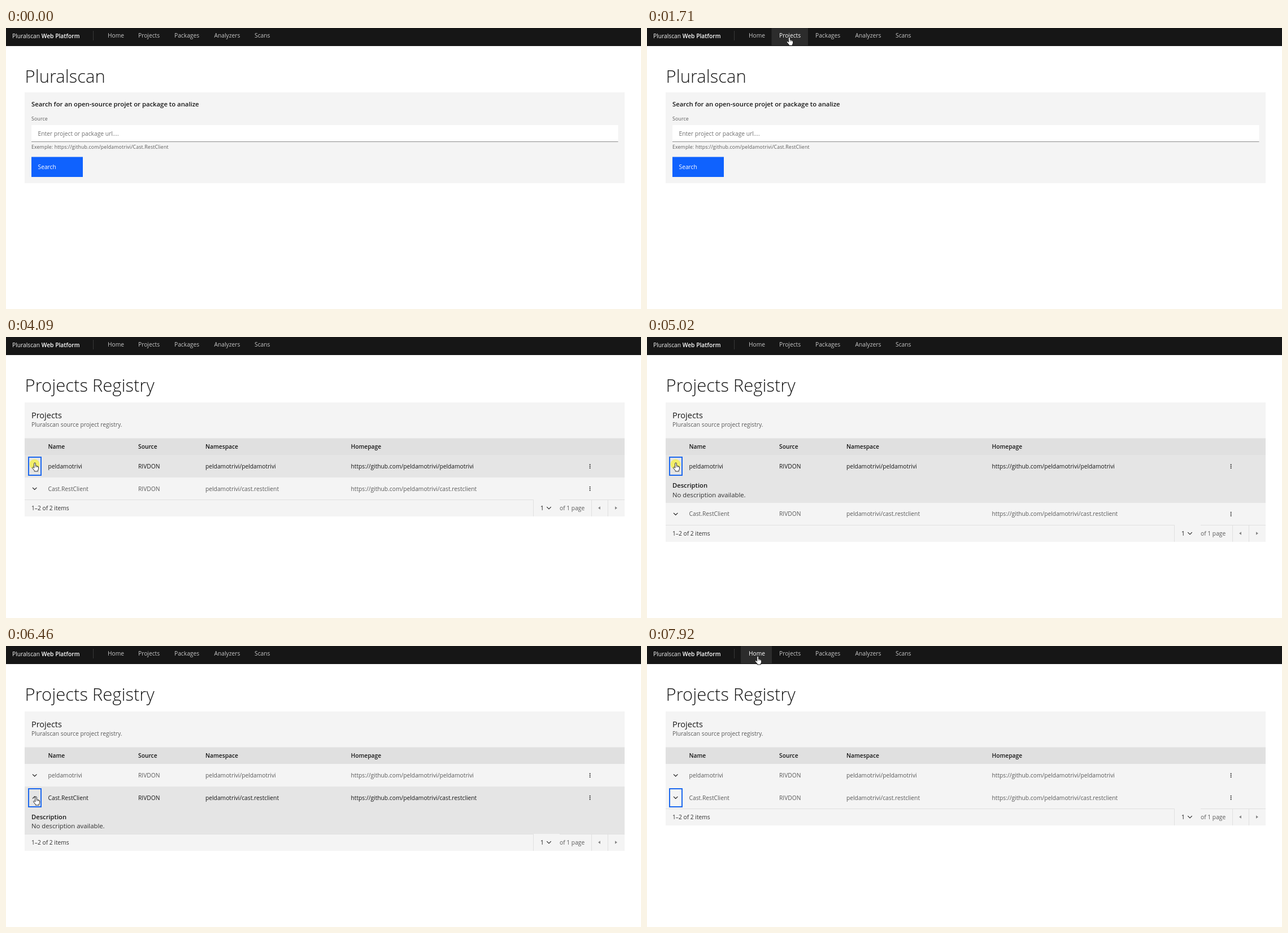
These frames come from a looping animation (1124 by 498 pixels, 8 s). An HTML page with a canvas:

```html
<!DOCTYPE html>
<html lang="en">
<head>
<meta charset="utf-8">
<title>Pluralscan Web Platform</title>
<style>
  html, body { margin: 0; width: 100%; height: 100%; overflow: hidden; background: #fff; }
  canvas { display: block; width: 1124px; height: 498px; }
</style>
</head>
<body>
<canvas id="stage"></canvas>
<script>
const W = 1124, H = 498, LOOP = 8000;
const canvas = document.getElementById('stage');
const ctx = canvas.getContext('2d');
const dpr = window.devicePixelRatio || 1;
canvas.width = W * dpr;
canvas.height = H * dpr;

const INK = '#161616', MUTED = '#5a5a5a', CARD = '#f4f4f4', LINE = '#e0e0e0', BLUE = '#0f62fe';
const BODY = 10.25, ROW_HEIGHT = 39.5, PANEL_HEIGHT = 45;
const USER = 'peldamotrivi';
const SITE = 'https://github.com/';

const NAV = [
  { label: 'Home', x: 180 },
  { label: 'Projects', x: 234 },
  { label: 'Packages', x: 298 },
  { label: 'Analyzers', x: 368.5 },
  { label: 'Scans', x: 440 }
];
const COLUMNS = [74.5, 234, 353, 610.5];
const ROWS = [
  [USER, 'RIVDON', `${USER}/${USER}`, `${SITE}${USER}/${USER}`],
  ['Cast.RestClient', 'RIVDON', `${USER}/cast.restclient`, `${SITE}${USER}/cast.restclient`]
];
const CLICKS = [4090, 5020, 6320, 7110];

// time, x, y of the pointer tip
const POINTER = [
  [470, 1010, 468], [1270, 252, 16],
  [3180, 252, 16], [3950, 51, 223],
  [5090, 51, 223], [5310, 53, 260], [5530, 53, 267],
  [7140, 53, 267], [7850, 196, 18]
];

const HAND = new Path2D('M-1.3 1.2Q-1.2 0 0 0Q1.2 0 1.3 1.2V5.2Q2.8 4.6 3.3 5.8' +
  'Q4.8 5.2 5.1 6.5Q6.5 6.3 6.5 7.8V10.6Q6.4 12 5.4 13.2V15H-.8V13.6L-4.3 9.4' +
  'Q-4.9 8 -3.6 7.6Q-2.6 7.5 -1.3 9.2Z');
const ARROW = new Path2D('M0 0V13.5L3.1 10.6L5.2 15.4L7.4 14.4L5.3 9.8H9.6Z');

const ramp = (t, from, to) => Math.min(1, Math.max(0, (t - from) / (to - from)));
const ease = p => p * p * (3 - 2 * p);
const between = (t, from, to) => t >= from && t < to;

function pointerAt(t) {
  let i = 0;
  while (i < POINTER.length - 2 && t >= POINTER[i + 1][0]) i++;
  const [t0, x0, y0] = POINTER[i], [t1, x1, y1] = POINTER[i + 1];
  const p = ease(ramp(t, t0, t1));
  return { x: x0 + (x1 - x0) * p, y: y0 + (y1 - y0) * p };
}

function box(x, y, w, h, color, alpha = 1) {
  ctx.globalAlpha = alpha;
  ctx.fillStyle = color;
  ctx.fillRect(x, y, w, h);
  ctx.globalAlpha = 1;
}

function text(str, x, y, color = INK, size = BODY, weight = 400, spacing = 0) {
  ctx.font = `${weight} ${size}px "Open Sans", "Noto Sans", sans-serif`;
  ctx.letterSpacing = spacing + 'px';
  ctx.fillStyle = color;
  ctx.fillText(str, x, y);
}

const title = str => text(str, 33.5, 97, INK, 31, 300);

function chevron(x, y, turn = 0) {
  const k = 1 - 2 * turn;
  ctx.beginPath();
  ctx.moveTo(x - 3.7, y - 1.8 * k);
  ctx.lineTo(x, y + 1.8 * k);
  ctx.lineTo(x + 3.7, y - 1.8 * k);
  ctx.strokeStyle = INK;
  ctx.lineWidth = 1.1;
  ctx.stroke();
}

function caret(x, y, dir) {
  ctx.beginPath();
  ctx.moveTo(x + 2 * dir, y);
  ctx.lineTo(x - 2 * dir, y - 2.8);
  ctx.lineTo(x - 2 * dir, y + 2.8);
  ctx.fillStyle = '#858585';
  ctx.fill();
}

function drawHeader(t) {
  box(0, 0, W, 32, INK);
  text('Pluralscan', 11, 17.6, '#f4f4f4');
  text('Web Platform', 62.7, 17.6, '#fff', BODY, 600);
  box(154, 5, 1, 17, '#393939');

  const glow = {
    Home: ramp(t, 7640, 7850),
    Projects: ramp(t, 1420, 1710) * (1 - ramp(t, 3220, 3440))
  };
  const lit = {
    Home: t >= 7920,
    Projects: between(t, 1200, 3290)
  };
  box(166, 0, 55, 31, '#2c2c2c', glow.Home);
  box(220.5, 0, 64.5, 31, '#2c2c2c', glow.Projects);
  for (const { label, x } of NAV) text(label, x, 17.3, lit[label] ? '#fff' : '#c6c6c6');
}

function drawHome() {
  title('Pluralscan');
  box(33, 114, 1062, 161, CARD);
  text('Search for an open-source projet or package to analize', 45, 138.8, INK, 11.3, 600);
  text('Source', 45, 163.6, MUTED, 8.7, 400, 0.18);
  box(45, 172, 1038.5, 29.5, '#fff');
  box(45, 201, 1038.5, 1, '#8d8d8d');
  text('Enter project or package url....', 56.5, 190.7, '#6f6f6f');
  text(`Exemple: ${SITE}${USER}/Cast.RestClient`, 45, 213.8, MUTED, 8.7, 400, 0.18);
  box(45, 228.5, 91, 35.5, BLUE);
  text('Search', 56.5, 249.7, '#fff');
}

function drawRow(cells, y, { tint, open, hover, focus }) {
  const bottom = y + ROW_HEIGHT;
  const top = Math.round(y), height = Math.round(bottom) - top;
  box(33, top, 1062, height, CARD);
  box(33, top, 1062, height, '#e5e5e5', tint);
  cells.forEach((cell, i) => text(cell, COLUMNS[i], y + 23.7, hover ? INK : MUTED));
  chevron(50.7, y + 19.8, open);
  for (const d of [-3, 0, 3]) box(1032.8, y + 19.1 + d, 1.7, 1.7, INK);
  if (focus) {
    ctx.strokeStyle = '#1c68ee';
    ctx.lineWidth = 2;
    ctx.strokeRect(40, top + 4, 22, 32);
  }
  if (open > 0) {
    ctx.save();
    ctx.beginPath();
    ctx.rect(33, top + height, 1062, PANEL_HEIGHT * open);
    ctx.clip();
    box(33, top + height, 1062, PANEL_HEIGHT, '#e5e5e5');
    text('Description', 45, bottom + 18.3, INK, 11.2, 600);
    text('No description available.', 45, bottom + 34.8, '#303030', 11.3);
    ctx.restore();
  }
  return bottom + PANEL_HEIGHT * open;
}

function drawPagination(y) {
  const top = Math.round(y);
  box(33, top, 1062, 30, CARD);
  box(33, top, 900, 1, LINE);
  box(980, top, 115, 1, LINE);
  for (const x of [933, 1036, 1065]) box(x, top, 1, 30, LINE);
  text('1\u20132 of 2 items', 45, y + 18.3, '#303030');
  text('1', 946, y + 18.3);
  chevron(961, y + 14.7);
  text('of 1 page', 980, y + 18.3, MUTED);
  caret(1050, y + 14.7, -1);
  caret(1080, y + 14.7, 1);
}

function drawRegistry(t, pointer) {
  title('Projects Registry');
  box(33, 116, 1062, 64, CARD);
  text('Projects', 45, 144, INK, 14.5);
  text('Pluralscan source project registry.', 45, 159, MUTED);
  box(33, 179.5, 1062, 30, LINE);
  ['Name', 'Source', 'Namespace', 'Homepage'].forEach((name, i) =>
    text(name, COLUMNS[i], 197.8, INK, BODY, 600));

  const states = [
    {
      open: ease(ramp(t, 4090, 4290)) - ease(ramp(t, 5020, 5230)),
      tint: t < 4090 ? 0 : 1 - ramp(t, 5330, 5530),
      focus: between(t, 4090, 6320)
    },
    {
      open: ease(ramp(t, 6330, 6460)) - ease(ramp(t, 7110, 7320)),
      tint: ramp(t, 6330, 6460) - ramp(t, 7330, 7540),
      focus: t >= 6320
    }
  ];
  let y = 209.3;
  states.forEach((state, i) => {
    state.hover = pointer.y >= y && pointer.y < y + ROW_HEIGHT;
    y = drawRow(ROWS[i], y, state);
  });
  drawPagination(y);
}

function drawPointer(t, { x, y }) {
  if (t < 470) return;
  if (CLICKS.some(click => between(t, click, click + 140))) {
    ctx.fillStyle = 'rgba(243, 238, 92, .9)';
    ctx.beginPath();
    ctx.arc(x - 0.5, y + 2.5, 9, 0, 2 * Math.PI);
    ctx.fill();
  }
  const overLink = y < 31 || (t >= 3180 && x < 63 && y > 212);
  const shape = overLink ? HAND : ARROW;
  ctx.save();
  ctx.translate(x, y);
  ctx.fillStyle = '#fff';
  ctx.strokeStyle = '#111';
  ctx.lineWidth = 0.9;
  ctx.lineJoin = 'round';
  ctx.fill(shape);
  ctx.stroke(shape);
  if (overLink) {
    ctx.lineWidth = 0.6;
    ctx.beginPath();
    for (const dx of [1.3, 3.3, 5.1]) {
      ctx.moveTo(dx, 5.8);
      ctx.lineTo(dx, 8);
    }
    ctx.stroke();
  }
  ctx.restore();
}

function draw(t) {
  const pointer = pointerAt(t);
  ctx.setTransform(dpr, 0, 0, dpr, 0, 0);
  box(0, 0, W, H, '#fff');
  drawHeader(t);
  if (t < 1990) drawHome();
  else drawRegistry(t, pointer);
  drawPointer(t, pointer);
}

const start = performance.now();
function tick() {
  draw((performance.now() - start) % LOOP);
  requestAnimationFrame(tick);
}
tick();
</script>
</body>
</html>
```
